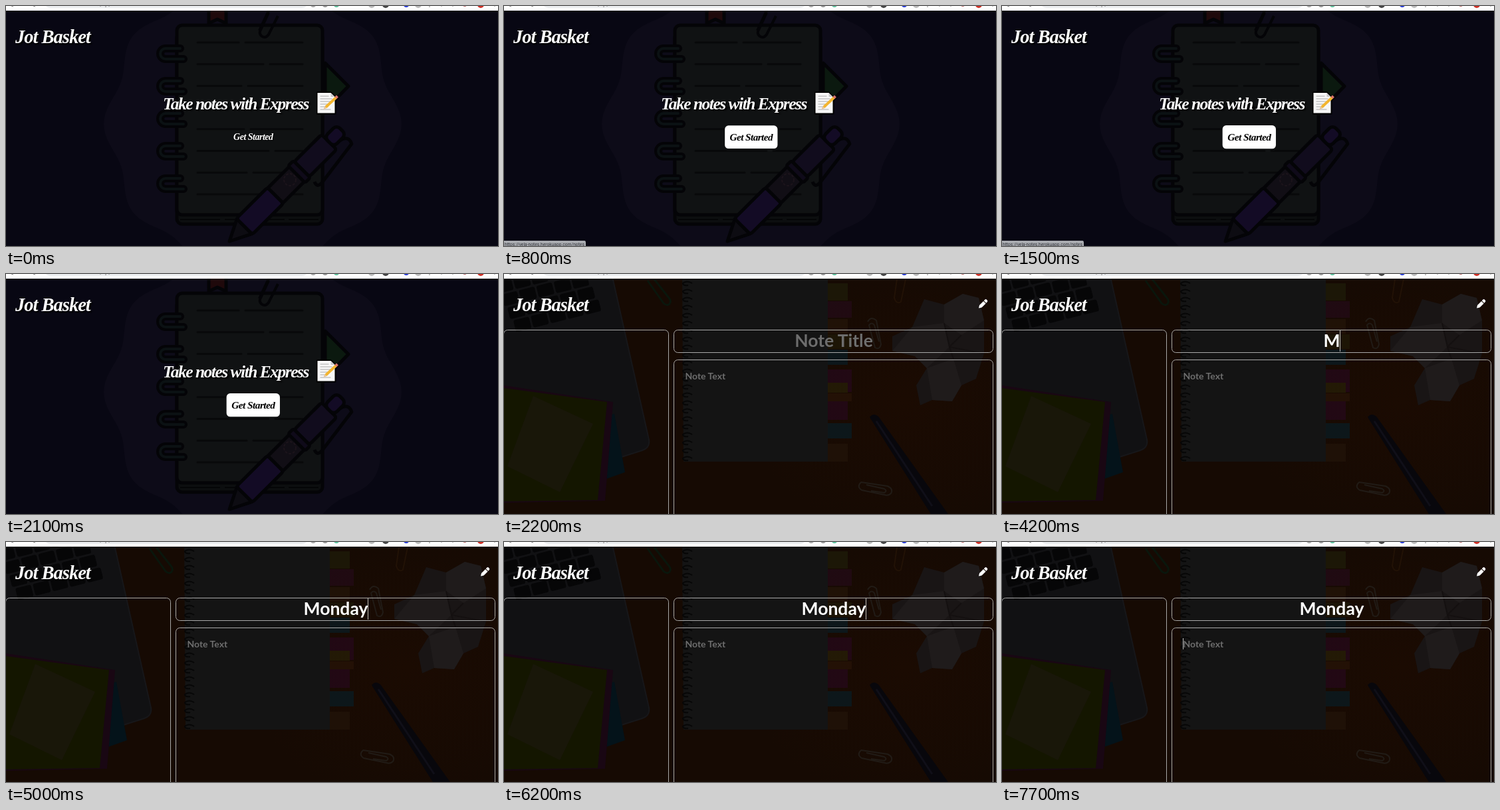
These frames come from a looping animation (740x362 px, 8 s). An HTML page:

```html
<!DOCTYPE html>
<html lang="en">
<head>
<meta charset="utf-8">
<title>Jot Basket</title>
<style>
  html, body { margin: 0; width: 100%; height: 100%; overflow: hidden; background: #080713; }
  svg { display: block; width: 740px; height: 362px; }
  .brush { font: italic 700 25.5px "Liberation Serif", serif; letter-spacing: -1.5px; fill: #fff; }
  .shadow { text-shadow: 2px 2px 2px #000; }
  .round { font: 700 26.5px Lato, sans-serif; }
  .small { font-size: 14px; }
  .hint { fill: #6d6d6d; }
  .mid { text-anchor: middle; }
  .line { fill: none; stroke: #a8a8a8; }
  .caret { stroke: #bbb; stroke-width: 1; }
  .ink { stroke: #040407; stroke-width: 5; stroke-linejoin: round; }
</style>
</head>
<body>
<svg viewBox="0 0 740 362">
  <g id="home">
    <rect width="740" height="362" fill="#080713"/>
    <path id="badge" fill="#0d0b18"/>
    <path d="M305 0h26v26l-13-6-13 6z" fill="#1f090b" class="ink"/>
    <path d="M480 86l35 35-35 36z" fill="#0b190f" class="ink"/>
    <rect x="257" y="40" width="219" height="289" rx="8" fill="#0c0e0f" class="ink"/>
    <rect x="257" y="29" width="219" height="286" rx="8" fill="#101213" class="ink"/>
    <path d="M262 322h208" stroke="#050607" stroke-width="2" stroke-dasharray="60 7 90 6"/>
    <g id="rules" stroke="#08090a" stroke-width="3" stroke-linecap="round"></g>
    <g id="rings" fill="none" stroke-linecap="round"></g>
    <path d="M381 37l15-32m13 10l-14 28q-5 7-11 2-4-4-1-9l12-26" fill="none" stroke="#040407" stroke-width="4"/>
    <g transform="translate(336 355) rotate(-45)">
      <path d="M226 10q14 4 8 16L160 36q-10 0-6-9" fill="none" class="ink"/>
      <path d="M0 0L32-16V16z" fill="#0d0c12" class="ink"/>
      <rect x="32" y="-17" width="66" height="34" rx="4" fill="#130b25" class="ink"/>
      <rect x="98" y="-16" width="48" height="32" fill="#110e15" class="ink"/>
      <rect x="154" y="-16" width="58" height="32" rx="4" fill="#110c1d" class="ink"/>
      <rect x="143" y="-18" width="11" height="36" rx="3" fill="#0f0a19" class="ink"/>
      <rect x="212" y="-10" width="26" height="20" rx="7" fill="#130b25" class="ink"/>
    </g>
    <circle cx="427" cy="262" r="9" fill="none" stroke="#1c141b" stroke-width="2" stroke-dasharray="4 2"/>

    <text x="236" y="156" class="brush shadow">Take notes with Express</text>
    <g transform="translate(468.500 131)">
      <path d="M-1.500-1.500H21L28 6V32.500H-1.500z" fill="#000"/>
      <path d="M0 0H20L26 6V30.500H0z" fill="#f7f7f7"/>
      <path d="M20 0V6H26z" fill="#c9c9c9"/>
      <path d="M4 5h13M4 9h18M4 13h18M4 17h13M4 21h12M4 25h16" stroke="#aaa" stroke-width="1.200"/>
      <path d="M9 25l2-5 3 3z" fill="#e9c393"/>
      <path d="M12.500 21.500L28 7" stroke="#f3b52f" stroke-width="4"/>
      <path d="M27.500 7.500l2.500-2.500" stroke="#d9746c" stroke-width="4"/>
    </g>
    <g id="button">
      <rect id="plate" x="-36.500" y="-16" width="73" height="32" rx="5" fill="#fff"/>
      <text id="label" y="4.500" class="brush mid" style="font-size:14px;letter-spacing:-.5px">Get Started</text>
    </g>
    <g id="status">
      <path d="M0 354h121q2 0 2 3v5H0z" fill="#a9abb0"/>
      <text x="1" y="362" font-family="Roboto, sans-serif" font-size="6.700" fill="#303238">https://vela-notes.herokuapp.com/notes</text>
    </g>
  </g>

  <g id="notes">
    <rect width="740" height="362" fill="#160a03"/>
    <radialGradient id="glow"><stop stop-color="#1b0b02"/><stop offset="1" stop-color="#1b0b02" stop-opacity="0"/></radialGradient>
    <ellipse cx="600" cy="190" rx="240" ry="200" fill="url(#glow)"/>
    <path d="M0 0H162L218 250q2 12-10 16L120 292 0 320z" fill="#111113"/>
    <path d="M162 0L218 250q2 12-10 16l-50 16" fill="none" stroke="#17171a" stroke-width="2"/>
    <g id="keys" fill="#060607"></g>
    <path d="M150 215l16-4 16 88-28 10z" fill="#04131a"/>
    <path d="M0 168l164 25-12 149L0 345z" fill="#190713"/>
    <path d="M0 172l155 21-14 148L0 343z" fill="#141600"/>
    <path d="M44 184l90 42-50 103L5 290z" fill="#191709"/>
    <path d="M216 10l24 34q5 5 9 1 3-4-1-9L226 8" fill="none" stroke="#0a160c" stroke-width="3"/>
    <path d="M268 0H487V283H270z" fill="#141414"/>
    <g id="coils" fill="none" stroke="#070707" stroke-width="2"></g>
    <g id="tabs" opacity=".6"></g>
    <path id="paper" d="M632 38l30 8 28-16 24 6 8 34v50l-12 38-22 10-14 24-30-2-18 8-6-30 16-26-18-18-34-8v-22l30-14z" fill="#191515"/>
    <path d="M662 46l28-16 24 6 8 34-34 22-26-18zM614 80l48-6 8 36-34 32-18-18-34-8zM636 142l40-14 12 40-14 24-30-2z" fill="#1f1b1b"/>
    <path d="M662 74l8 36 18-18M676 128l-6-18 52 10" fill="none" stroke="#141010" stroke-width="2"/>
    <g fill="none" stroke="#211b16" stroke-width="2">
      <path d="M547 72q5-9 13-2l7 36q-2 9-9 5l-9-34q4-5 8 0l7 25"/>
      <path d="M537 314l40 6q9 4 5 11-4 4-10 2l-34-7q-8-5-1-12m8 4l27 6q5 3 0 6l-20-3"/>
      <path d="M591 8l-4 28q3 10 10 6l7-34" stroke="#221206"/>
    </g>
    <path d="M550 216q6-8 14 0L668 362H642z" fill="#08070c"/>
    <path d="M560 222l84 128" stroke="#100f18" stroke-width="3"/>

    <rect x="-.5" y="84.500" width="248" height="300" rx="6" class="line"/>
    <rect x="255.500" y="84.500" width="480" height="34" rx="6" class="line"/>
    <rect x="255.500" y="129.500" width="480" height="260" rx="6" class="line"/>
    <g transform="translate(714 51.500) rotate(-45)" fill="#fff">
      <path d="M0 0l4-2.500H12.500V2.500H4z"/><path d="M13.500-2.500h2q2 0 2 2v1q0 2-2 2h-2z"/>
    </g>
    <text id="title" x="496" y="110" class="round mid"></text>
    <text x="272.500" y="158.500" class="round small hint">Note Text</text>
    <path id="titleCaret" d="M0 85V117" class="caret"/>
    <path id="textCaret" d="M272.500 145V162" class="caret"/>
  </g>

  <text x="14" y="56" class="brush shadow" style="font-size:28.5px;letter-spacing:-1px">Jot Basket</text>
  <g>
    <rect width="740" height="7" fill="#fff"/>
    <path d="M60 0H452q-3 3-8 3H68q-5 0-8-3z" fill="#eceef0"/>
    <path d="M8 0l3 1M41 0l3 1M142 0v1m8-1v2m5-2v1M637 0v2M655 0v1M672 0v1M735 0v1" stroke="#888"/>
    <g id="icons"></g>
  </g>
</svg>
<script>
const $ = id => document.getElementById(id);
const repeat = (id, n, make) => {
  $(id).innerHTML = Array.from({ length: n }, (_, i) => make(i)).join('');
};

// scenery
const rim = Array.from({ length: 180 }, (_, i) => {
  const a = i * Math.PI / 90, r = 216 + 8 * Math.cos(10 * a);
  return `${(371 + r * Math.cos(a)).toFixed(1)} ${(178 + r * Math.sin(a)).toFixed(1)}`;
});
$('badge').setAttribute('d', `M${rim.join('L')}Z`);

repeat('rules', 8, i => {
  const y = 55 + i * 32.7, gap = 350 + (i * 37) % 70;
  return `<path d="M288 ${y}H${gap}M${gap + 10} ${y}H446"/>`;
});
repeat('rings', 5, i => {
  const loop = `M262 ${64 + i * 49}H240a8 8 0 0 0 0 16H267`;
  return `<path d="${loop}" stroke="#040407" stroke-width="12"/>
    <path d="${loop}" stroke="#0b1113" stroke-width="4"/>`;
});
repeat('keys', 20, i => {
  const col = i % 5, row = (i - col) / 5;
  return `<rect x="${col * 27 - 4 + row * 4}" y="${-5 + row * 21}" width="24" height="18" rx="3" transform="rotate(-14 60 40)"/>`;
});
repeat('coils', 23, i => `<path d="M283 ${14 + i * 12}q-8-5-14 0q0 4 8 3"/>`);

const tabs = [
  [14, 26, '#20200a'], [41, 25, '#260b1c'], [68, 22, '#26180a'], [91, 22, '#211d08'], [114, 23, '#06202b'],
  [144, 34, '#280820'], [164, 15, '#2b2408'], [180, 12, '#2b1608'], [192, 28, '#280820'], [225, 23, '#06202b'], [256, 27, '#23160a']
];
repeat('tabs', tabs.length, i => {
  const [y, h, fill] = tabs[i];
  return `<rect x="487" y="${y}" width="${i % 2 ? 36 : 30}" height="${h}" fill="${fill}"/>`;
});

const icons = [
  [462, 4, '#aaa'], [480, 4, '#999'], [497, 4, '#5cc49d'], [550, 5, '#bbb'], [571, 5, '#444'],
  [602, 4, '#2438d8'], [620, 5, '#bbb'], [690, 3, '#b66'], [714, 5, '#cf2f25']
];
repeat('icons', icons.length, i => {
  const [x, r, fill] = icons[i];
  return `<circle cx="${x}" cy="-2" r="${r}" fill="${fill}"/>`;
});

// timeline
const LOOP = 8000, CUT = 2200;
const HOVER = 300, GROW = 800;
const keyTimes = [4200, 4400, 4600, 4700, 4900, 5000];
const titleFocus = [[3400, 3930], [4200, 5530], [6060, 6550]];
const textFocus = [[6600, 7150], [7680, LOOP]];

const clamp = p => Math.min(1, Math.max(0, p));
const easeOut = p => 1 - (1 - p) ** 2;
const within = (t, spans) => spans.some(([a, b]) => t >= a && t < b);
const show = (id, on) => $(id).setAttribute('visibility', on ? 'visible' : 'hidden');

function drawHome(t) {
  const scale = 1 + .1 * easeOut(clamp((t - HOVER) / GROW));
  const fade = clamp((t - HOVER) / 350), tone = Math.round(255 * (1 - fade));
  $('button').setAttribute('transform', `translate(371.8 197.7) scale(${scale})`);
  $('plate').setAttribute('opacity', fade);
  $('label').style.fill = `rgb(${tone},${tone},${tone})`;
  $('label').style.textShadow = fade < .5 ? '1px 1px 1px #000' : 'none';
  $('status').setAttribute('display', t >= 600 && t < 1900 ? 'inline' : 'none');
}

function drawNotes(t) {
  const title = $('title');
  const typed = 'Monday'.slice(0, keyTimes.filter(k => t >= k).length);
  const text = typed || 'Note Title';
  if (title.textContent !== text) title.textContent = text;
  title.style.fill = typed ? '#fff' : '#6d6d6d';
  const x = 496 + (typed ? title.getComputedTextLength() / 2 : 0);
  $('titleCaret').setAttribute('transform', `translate(${Math.floor(x) + .5} 0)`);
  show('titleCaret', within(t, titleFocus));
  show('textCaret', within(t, textFocus));
}

const start = performance.now();
function draw() {
  const t = (performance.now() - start) % LOOP;
  const home = t < CUT;
  $('home').setAttribute('display', home ? 'inline' : 'none');
  $('notes').setAttribute('display', home ? 'none' : 'inline');
  (home ? drawHome : drawNotes)(t);
  requestAnimationFrame(draw);
}
draw();
</script>
</body>
</html>
```
